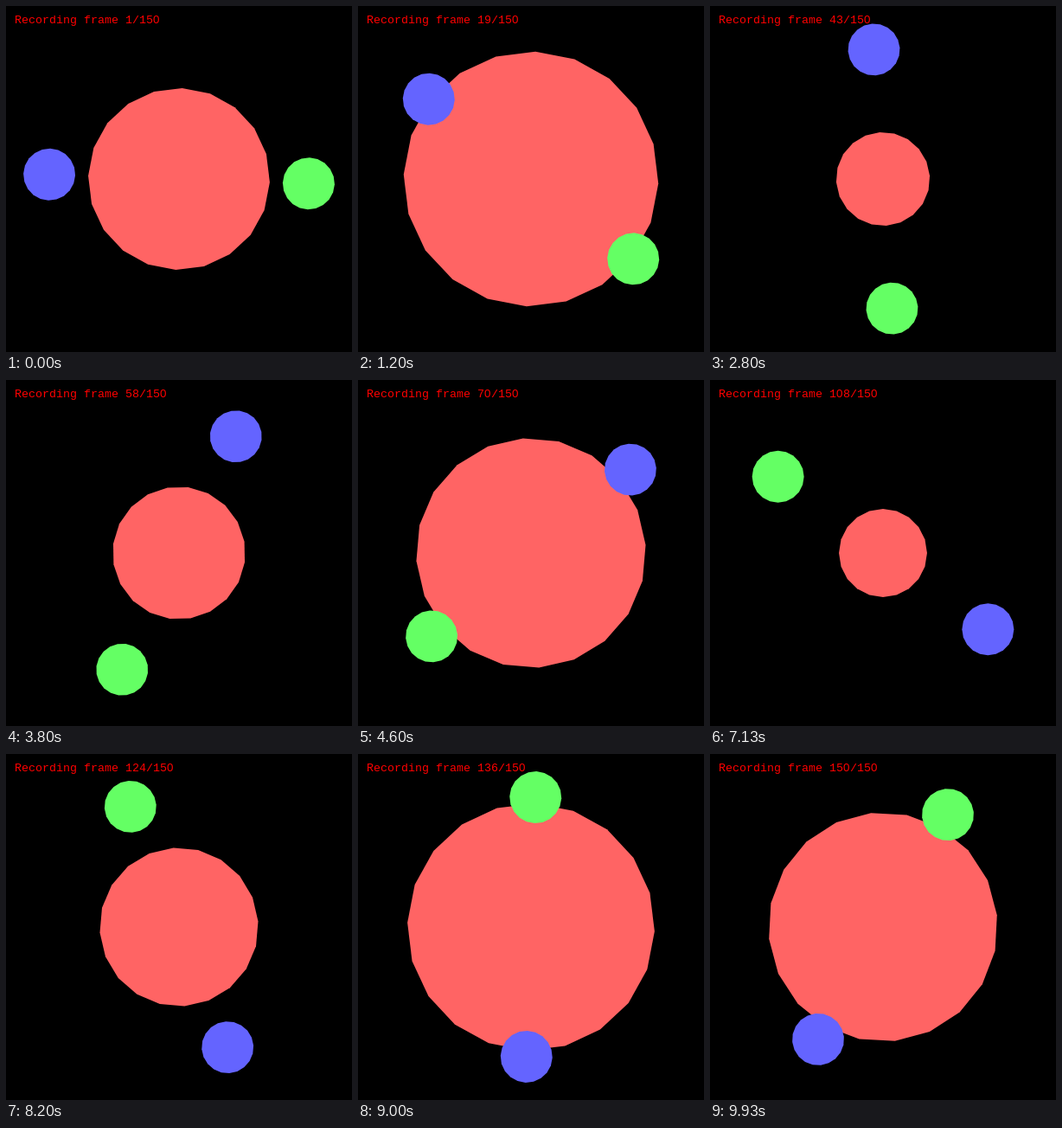
These frames come from a looping animation (400x400 px, 10 s). An HTML page:

```html
<!DOCTYPE html>
<html lang="en">
<head>
<meta charset="utf-8">
<title>Orbiting discs</title>
<style>
html, body { margin: 0; width: 100%; height: 100%; overflow: hidden; background: #000; }
svg { display: block; width: 100vw; height: 100vh; }
text { font: 13.33px "Liberation Mono", monospace; fill: #f00; white-space: pre; }
.zero { font-family: "Liberation Sans", sans-serif; }
</style>
</head>
<body>
<svg viewBox="0 0 400 400">
  <rect width="400" height="400" fill="#000"/>
  <polygon id="core" fill="#ff6464"/>
  <polygon id="green" fill="#64ff64"/>
  <polygon id="blue" fill="#6464ff"/>
  <text id="label" y="20"></text>
</svg>
<script>
const LOOP = 10000, STEPS = 150, SIDES = 20, CENTER = 200, ORBIT = 150;
const [core, green, blue, label] =
  ['core', 'green', 'blue', 'label'].map(id => document.getElementById(id));

function disc(el, dist, radius, angle) {
  const cx = CENTER + dist * Math.cos(angle);
  const cy = CENTER + dist * Math.sin(angle);
  const points = [];
  for (let i = 0; i < SIDES; i++) {
    const a = angle + i * 2 * Math.PI / SIDES;
    points.push((cx + radius * Math.cos(a)).toFixed(2) + ',' + (cy + radius * Math.sin(a)).toFixed(2));
  }
  el.setAttribute('points', points.join(' '));
}

function write(text) {
  // one 8px cell per character
  label.setAttribute('x', [...text].map((_, i) => 10 + 8 * i).join(' '));
  label.innerHTML = text.replace(/0/g, '<tspan class="zero">0</tspan>');
}

let shown = 0;
function render(time) {
  // 15 steps per second, switching on 10 ms ticks
  const tick = Math.floor((time % LOOP) / 10);
  const n = Math.floor(tick * 0.15 + 0.0501) % STEPS + 1;
  if (n === shown) return;
  shown = n;
  const angle = n * Math.PI / 90;
  disc(core, 0, 100 + 50 * Math.sin(n / 10), angle);
  disc(green, ORBIT, 30, angle);
  disc(blue, -ORBIT, 30, angle);
  write(`Recording frame ${n}/${STEPS}`);
}

const start = performance.now();
function loop() {
  render(performance.now() - start);
  requestAnimationFrame(loop);
}
loop();
</script>
</body>
</html>
```
